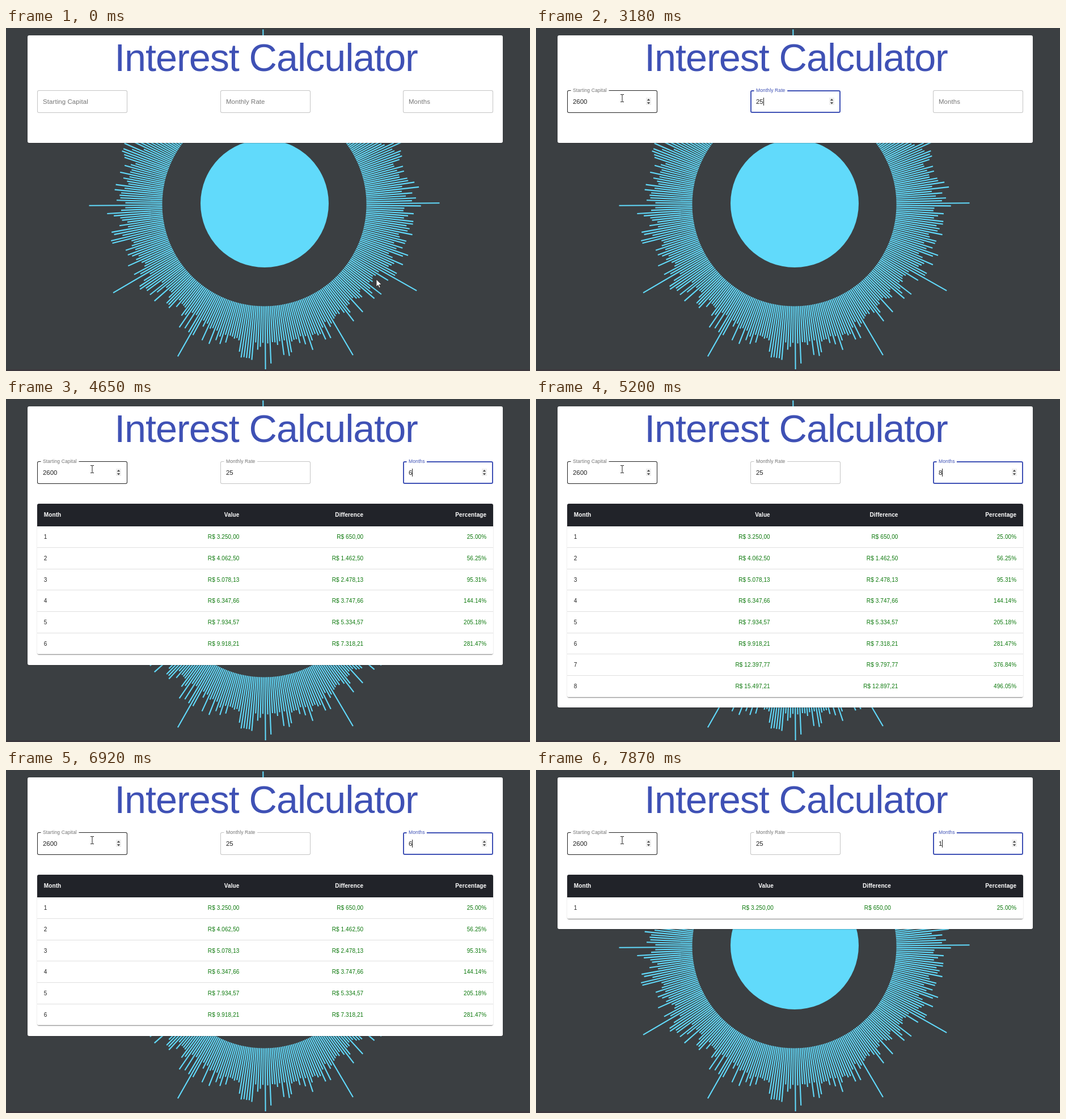
These frames come from a looping animation (924 by 606 pixels, 8000 ms). An HTML page:

```html
<!DOCTYPE html>
<html lang="en">
<head>
<meta charset="utf-8">
<title>Interest Calculator</title>
<style>
* { box-sizing: border-box; }
html, body { margin: 0; width: 100%; height: 100%; overflow: hidden; }
body { position: relative; background: #3b3f42; font: 11.43px/14px "Liberation Sans", Arial, sans-serif; color: #212121; }
#art, .cursor { position: absolute; left: 0; top: 0; overflow: visible; }
#card { position: absolute; left: 38px; top: 13px; width: 838px; background: #fff; border-radius: 3px; box-shadow: 0 1px 1px rgba(0,0,0,.2); }
h1 { margin: 0; padding-left: 3px; font-size: 68.4px; font-weight: 400; line-height: 78.4px; letter-spacing: -.01562em; text-align: center; color: #3f51b5; }
.field { position: absolute; top: 97px; width: 159px; height: 40px; border-radius: 3px; }
.field label, .field output { position: absolute; left: 10px; top: 12.6px; white-space: pre; }
.field label { letter-spacing: .00938em; background: #fff; box-shadow: 0 0 0 4.6px #fff; transform-origin: 0 50%; }
.field output { border-right: 1px solid transparent; }
.field svg { position: absolute; left: 139px; top: 13px; }
table { position: absolute; left: 17.4px; top: 172.3px; width: 803.3px; border-spacing: 0; border-radius: 3px; overflow: hidden;
  font-size: 10px; letter-spacing: .01071em; white-space: nowrap;
  box-shadow: 0 1.4px 1px -.7px rgba(0,0,0,.3), 0 .7px 1px rgba(0,0,0,.2), 0 .7px 2px rgba(0,0,0,.12); }
th, td { padding: 0 11.43px; text-align: right; }
th { height: 40.2px; background: #212329; color: #fff; }
td { height: 37.66px; padding-top: 1px; border-bottom: 1px solid #e0e0e0; color: #0b780b; }
th:first-child, td:first-child { text-align: left; }
td:first-child { color: #212121; }
</style>
</head>
<body>
<svg id="art" width="924" height="606">
  <path id="rays" stroke="#61dafb" stroke-width="2.1" fill="none"/>
  <circle cx="456" cy="310" r="113" fill="#61dafb"/>
  <rect y="603" width="924" height="3" fill="#3d383e"/>
</svg>
<div id="card"><h1>Interest Calculator</h1><table></table></div>
<svg class="cursor" id="arrow" width="12" height="17"><path d="M0 0V13L3 10.2L5.2 15L7.2 14.1L5 9.5H9.2Z" fill="#fff" stroke="#222" stroke-width=".8"/></svg>
<svg class="cursor" id="beam" width="8" height="15"><path d="M-3 -6.5H-.7L0 -6L.7 -6.5H3M0 -6V6M-3 6.5H-.7L0 6L.7 6.5H3" fill="none" stroke="#222"/></svg>
<script>
const LOOP = 8000, BLUE = '#3f51b5', GREY = '#757575';
const $ = id => document.getElementById(id);
const clamp = v => Math.max(0, Math.min(1, v));
const ease = v => v * v * (3 - 2 * v);

// One ray per degree: random lengths, a long one every 30 degrees.
let seed = 7, rays = '';
for (let i = 0; i < 360; i++) {
  seed = seed * 16807 % 2147483647;
  const a = (i - .4) * Math.PI / 180;
  const r = i % 30 ? 235 + 38 * (seed / 2147483647) ** 2 + 9 * Math.cos(4 * a) : 309;
  const at = d => `${(455.5 + d * Math.cos(a)).toFixed(1)} ${(311.5 + d * Math.sin(a)).toFixed(1)}`;
  rays += `M${at(180)}L${at(r)}`;
}
$('rays').setAttribute('d', rays);

// Each field gives its value as a function of the number of key presses so far.
const pressTimes = (first, step, count) => Array.from({ length: count }, (_, i) => first + i * step);
const fields = [
  { name: 'Starting Capital', x: 17, focus: 450, blur: 2550,
    presses: [960, 1130, ...pressTimes(1610, 37, 24)], value: n => 100 * n },
  { name: 'Monthly Rate', x: 340, focus: 2550, blur: 3200,
    presses: [2790, 2930], value: n => '25'.slice(0, n) },
  { name: 'Months', x: 662, focus: 3200, blur: LOOP,
    presses: [3550, ...pressTimes(3800, 212, 5), 5050, 5200, 5750, 6500, 6700, 6920, 7090, 7240, 7480, 7680, 7870],
    value: n => 9 - Math.abs(n - 9) }
];
for (const f of fields) {
  const box = document.createElement('div');
  box.className = 'field';
  box.style.left = f.x + 'px';
  box.innerHTML = `<label>${f.name}</label><output></output>
    <svg width="10" height="14"><path d="M0 0H9V13H0Z" fill="#efefef"/><path d="M1.8 5.3L4.5 2L7.2 5.3ZM1.8 8.2L4.5 11.5L7.2 8.2Z" fill="#444"/></svg>`;
  $('card').append(box);
  [f.label, f.output, f.spin] = box.children;
  f.box = box;
}

function drawField(f, t, hover) {
  const focused = t >= f.focus && t < f.blur;
  const p = ease(clamp((t - f.focus) / 200));
  const done = f.presses.filter(time => time <= t);
  const idle = t - Math.max(f.focus, ...done);
  f.box.style.boxShadow = `inset 0 0 0 ${focused ? 2 : 1}px ${focused ? BLUE : hover ? '#212121' : '#c4c4c4'}`;
  f.label.style.transform = `translateY(${-19.6 * p}px) scale(${1 - p / 4})`;
  f.label.style.color = focused ? BLUE : GREY;
  f.output.textContent = f.value(done.length) || '';
  f.output.style.borderColor = focused && idle % 1100 < 550 ? '#212121' : 'transparent';
  f.spin.style.display = focused || hover ? '' : 'none';
}

const money = v => {
  const [whole, cents] = v.toFixed(2).split('.');
  return `R$ ${whole.replace(/\B(?=(\d{3})+$)/g, '.')},${cents}`;
};
const table = document.querySelector('table');
let shown = -1;
function drawTable(n) {
  if (n === shown) return;
  shown = n;
  $('card').style.height = (n ? 230.7 + 37.66 * n : 190) + 'px';
  let html = n ? '<tr><th>Month<th>Value<th>Difference<th>Percentage</tr>' : '';
  for (let i = 1; i <= n; i++) {
    const growth = 1.25 ** i;
    html += `<tr><td>${i}<td>${money(2600 * growth)}<td>${money(2600 * (growth - 1))}<td>${(100 * (growth - 1)).toFixed(2)}%</tr>`;
  }
  table.innerHTML = html;
}

function frame(now) {
  const t = now % LOOP;
  const m = ease(clamp((t - 30) / 420));
  const x = 653 - 501 * m, y = 444 - 320 * m;
  const hover = x > 55 && x < 214 && y > 110 && y < 150;
  for (const id of ['arrow', 'beam']) {
    $(id).style.transform = `translate(${Math.round(x)}px, ${Math.round(y)}px)`;
    $(id).style.display = hover === (id === 'beam') ? '' : 'none';
  }
  fields.forEach((f, i) => drawField(f, t, hover && i === 0));
  drawTable(+fields[2].output.textContent);
  requestAnimationFrame(frame);
}
frame(0);
</script>
</body>
</html>
```
